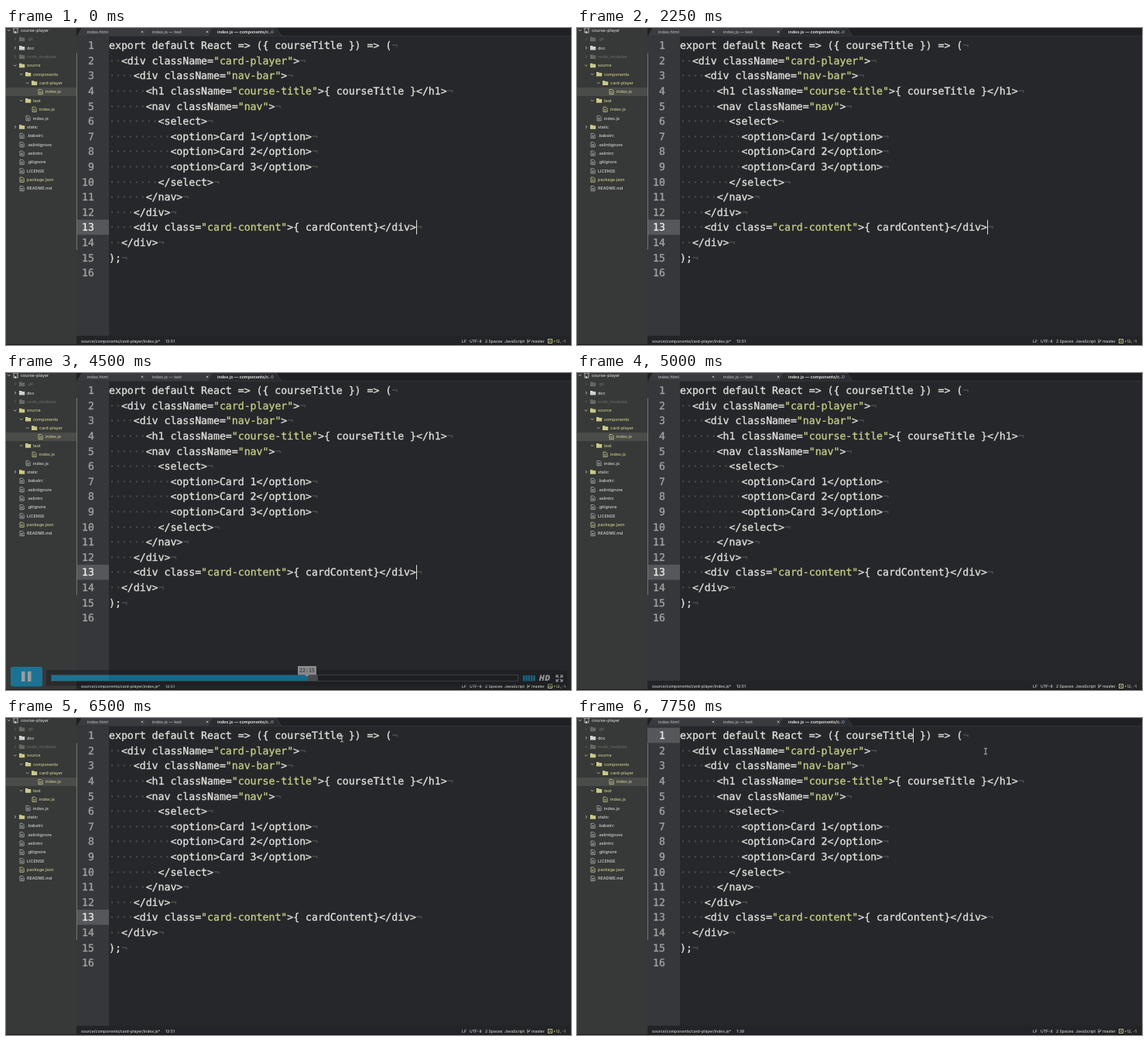
Write an HTML page that moves like this. It is 730 px wide and 410 px high and loops after 8000 ms.

```html
<!DOCTYPE html>
<html lang="en">
<head>
<meta charset="utf-8">
<title>Code editor screencast</title>
<style>
  html, body { margin: 0; width: 100%; height: 100%; overflow: hidden; background: #26272b; }
  svg { display: block; width: 730px; height: 410px; }
  text { white-space: pre; text-rendering: geometricPrecision; }
  .code { font: 13.2px "DejaVu Sans Mono", monospace; color: #deded8; }
  .code, .code tspan { fill: currentColor; stroke: currentColor; stroke-width: .35px; }
  .code .str { color: #c3cb82; }
  .code .faint { color: #56585c; stroke: none; }
  .ui { font: 500 5.4px Inter, "Liberation Sans", sans-serif; fill: #d2d3ce; }
  .status { font-size: 5.1px; }
</style>
</head>
<body>
<svg id="stage" viewBox="0 0 730 410" xmlns="http://www.w3.org/2000/svg"></svg>
<script>
const NS = "http://www.w3.org/2000/svg";
const LOOP = 8000, STEP = 250;
const CHAR = 7.947, LINE = 19.6, CODE_X = 133, TOP = 12.7;
const YELLOW = "#cbc98a", LIGHT = "#d2d3ce", DIM = "#666862", BLUE = "#00adef";
const stage = document.getElementById("stage");

function add(parent, tag, attrs = {}, content) {
  const el = document.createElementNS(NS, tag);
  for (const key in attrs) el.setAttribute(key, attrs[key]);
  if (content !== undefined) el.textContent = content;
  parent.appendChild(el);
  return el;
}
const group = (parent = stage) => add(parent, "g");
const rect = (parent, x, y, width, height, fill, more) =>
  add(parent, "rect", { x, y, width, height, fill, ...more });
const path = (parent, d, more) => add(parent, "path", { d, ...more });
const label = (x, y, content, more) =>
  add(stage, "text", { class: "ui", x, y, ...more }, content);
const status = (x, content, more) =>
  label(x, 406.8, content, { class: "ui status", ...more });
const show = (el, on) => el.setAttribute("visibility", on ? "visible" : "hidden");

// Panels
rect(stage, 0, 0, 730, 410, "#26272b");
rect(stage, 0, 0, 91, 410, "#373938");
rect(stage, 91, 10, 42, 388, "#35373a");
rect(stage, 91, 398, 639, 12, "#232428");
rect(stage, 0, 409, 730, 1, "#1d191b");

// Tabs
rect(stage, 91, 0, 639, 10.5, "#1f2023");
function tab(x, end, title, active) {
  path(stage, `M${x - 8} 10.5L${x - 2} 0H${end}L${end + 7} 10.5Z`, {
    fill: active ? "#2b2c30" : "#3a3b3e", stroke: "#4a4c50", "stroke-width": .6
  });
  label(x + 5, 7, title, { style: active ? "fill:#ececE8;font-weight:600" : "fill:#b4b6b4" });
}
tab(100, 180, "index.html");
tab(184, 265, "index.js — test");
tab(268, 349, "index.js — components/c…", true);
rect(stage, 91, 10, 639, 1, "#303236");
for (const x of [176, 260])
  path(stage, `M${x - 1.3} 3.7l2.6 2.6m0-2.6l-2.6 2.6`, { stroke: "#c0c2c0", "stroke-width": .8 });
add(stage, "circle", { cx: 344, cy: 5, r: 1.5, fill: "none", stroke: "#7890a4", "stroke-width": .8 });

// File tree: [depth, name, kind, colour]; kinds are open/closed folders and files
const tree = [
  [0, "course-player", "root", LIGHT], [1, ".git", "closed", DIM],
  [1, "doc", "closed", LIGHT], [1, "node_modules", "closed", DIM],
  [1, "source", "open", YELLOW], [2, "components", "open", YELLOW],
  [3, "card-player", "open", YELLOW], [4, "index.js", "file", YELLOW],
  [2, "test", "open", YELLOW], [3, "index.js", "file", YELLOW],
  [2, "index.js", "file", LIGHT], [1, "static", "closed", LIGHT],
  [1, ".babelrc", "file", LIGHT], [1, ".eslintignore", "file", LIGHT],
  [1, ".eslintrc", "file", LIGHT], [1, ".gitignore", "file", LIGHT],
  [1, "LICENSE", "file", LIGHT], [1, "package.json", "file", YELLOW],
  [1, "README.md", "file", LIGHT]
];
rect(stage, 0, 77, 91, 11, "#4a4c4a");
tree.forEach(([depth, name, kind, color], i) => {
  const y = 3 + i * 11.36, x = 19 + depth * 8;
  if (kind !== "file") {
    const d = kind === "closed" ? `M${x - 16} ${y - 1.7}l1.8 1.7l-1.8 1.7`
                                : `M${x - 17} ${y - .9}l1.7 1.8l1.7-1.8`;
    path(stage, d, { fill: "none", stroke: color, "stroke-width": .8 });
  }
  if (kind === "root") {
    rect(stage, x - 9, y - 3, 5, 6, "none", { stroke: color, "stroke-width": .8 });
    rect(stage, x - 7.5, y + 1, 1.5, 3, color);
  } else if (kind === "file") {
    path(stage, `M${x - 9} ${y - 3}h3.4l1.8 1.8v4.4h-5.2z`, {
      fill: "none", stroke: color === LIGHT ? "#a5b0b2" : color, "stroke-width": .8
    });
    path(stage, `M${x - 8} ${y}h3m-3 1.5h3`, { stroke: color, "stroke-width": .6 });
  } else {
    const fill = name === "static" ? YELLOW : color;
    path(stage, `M${x - 10} ${y - 2.8}h3l.8 1h3.4v4.6h-7.2z`, { fill });
  }
  label(x, y + 1.9, name, { style: `fill:${color}` });
});

// Code
const code = `export default React => ({ courseTitle }) => (
  <div className="card-player">
    <div className="nav-bar">
      <h1 className="course-title">{ courseTitle }</h1>
      <nav className="nav">
        <select>
          <option>Card 1</option>
          <option>Card 2</option>
          <option>Card 3</option>
        </select>
      </nav>
    </div>
    <div class="card-content">{ cardContent}</div>
  </div>
);
`.split("\n");
const rowMark = rect(stage, 91, 0, 42, LINE, "#55575a");
rect(stage, 91, TOP + LINE, 1, LINE * 13, "#77796a");
const numbers = code.map((line, i) => {
  const y = TOP + 14.5 + i * LINE;
  const row = add(stage, "text", { class: "code", x: CODE_X, y });
  const body = line.trimStart();
  add(row, "tspan", { class: "faint" }, "·".repeat(line.length - body.length));
  for (const part of body.split(/("[^"]*")/))
    add(row, "tspan", part[0] === '"' ? { class: "str" } : {}, part);
  if (body) add(row, "tspan", { class: "faint" }, "¬");
  return add(stage, "text", { class: "code", x: 114, y, "text-anchor": "end" }, i + 1);
});
const caret = rect(stage, 0, 0, 1, LINE - 1, "#deded8");

// Status bar
status(97, "source/components/card-player/index.js*");
const position = status(206, "");
[[589, "LF"], [599, "UTF-8"], [619, "2 Spaces"], [644, "JavaScript"], [679, "master"]]
  .forEach(([x, s]) => status(x, s));
path(stage, "M674 402.5v5m0-1.5q3 0 3-3", { fill: "none", stroke: LIGHT, "stroke-width": .8 });
rect(stage, 700.5, 402.5, 5, 5, "none", { stroke: YELLOW, "stroke-width": .9 });
rect(stage, 702.2, 404.2, 1.6, 1.6, YELLOW);
status(707, "+12, -1", { style: `fill:${YELLOW}` });

// Video controls
const player = group();
rect(player, 52, 384, 673, 20.5, "#1a1b1e", { "fill-opacity": .92 });
rect(player, 6, 380, 41, 25.5, BLUE, { rx: 3 });
const pauseIcon = group(player);
for (const x of [20, 28]) rect(pauseIcon, x, 386, 4.5, 13, "#fff");
const playIcon = path(player, "M20 386l13 6.5l-13 6.5z", { fill: "#fff" });
rect(player, 58.5, 390.5, 603, 8, "#17181b", { stroke: "#505356", "stroke-width": 1 });
rect(player, 390, 391, 13, 7, "#6a6d6f");
rect(player, 59, 391, 331, 7, BLUE);
path(player, "M377 379h24v11.5h-9.5l-2.5 2.5l-2.5-2.5h-9.5z", { fill: "#e9eaea" });
add(player, "text", {
  x: 389, y: 387.2, "text-anchor": "middle", fill: "#222",
  style: 'font:6.6px "DejaVu Sans Mono",monospace'
}, "22:15");
for (let i = 0; i < 5; i++) rect(player, 668 + i * 3.3, 391, 2.3, 7.5, BLUE);
add(player, "text", {
  x: 688.5, y: 398.3, fill: "#fff",
  style: 'font:italic 800 10.5px "Open Sans","Liberation Sans",sans-serif'
}, "HD");
path(player, "M711 394v-3h3m2 0h3v3m0 2v3h-3m-2 0h-3v-3M711 391l3 3m5-3l-3 3m3 5l-3-3m-5 3l3-3", {
  fill: "none", stroke: "#fff", "stroke-width": 1.1
});

// Pointers
const beam = path(stage, "M-2-4q2 0 2 1.2q0-1.2 2-1.2M0-3V3M-2 4q2 0 2-1.2q0 1.2 2 1.2", {
  fill: "none", stroke: "#d8d8d4", "stroke-width": .8
});
const arrow = path(stage, "M0 0v7.2l1.7-1.5l1.2 2.7l1.3-.6l-1.2-2.6h2.3z", {
  fill: "#000", stroke: "#fff", "stroke-width": .6
});

// Pointer stops: [time, x, y, shape]; no shape hides it
const stops = [
  [0], [1250, 622, 185, beam], [1500, 534, 186, beam], [1750, 138, 317, beam],
  [2000, 24, 380, arrow], [2250], [3000, 18, 396, arrow], [4500],
  [5500, 187, 262, beam], [5750, 563, 130, beam], [6000, 431, 36, beam],
  [6250, 434, 27, beam], [6750], [7250, 455, 29, beam], [7500, 508, 39, beam],
  [7750, 528, 43, beam]
];
const CLICK = 6750;

function draw(time) {
  const t = Math.floor(time / STEP) * STEP;

  const clicked = t >= CLICK;
  const row = clicked ? 0 : 12, col = clicked ? 38 : 50;
  rowMark.setAttribute("y", TOP + row * LINE);
  numbers.forEach((n, i) => n.style.color = i === row ? "#ecece8" : "#a0a2a2");
  caret.setAttribute("x", Math.floor(CODE_X + col * CHAR));
  caret.setAttribute("y", TOP + row * LINE + .5);
  position.textContent = `${row + 1}:${col + 1}`;

  // The caret rests while the video is paused, then blinks
  const phase = (t - (clicked ? CLICK : 4500) + 1600) % 800;
  show(caret, t < 3750 || phase < 400);

  const playing = t >= 3500;
  player.setAttribute("display", t >= 3000 && t < 4750 ? "inline" : "none");
  player.setAttribute("opacity", t === 3000 || t === 4500 ? .5 : 1);
  show(pauseIcon, playing);
  show(playIcon, !playing);

  const [, x, y, shape] = stops.filter(s => s[0] <= t).pop();
  show(beam, shape === beam);
  show(arrow, shape === arrow);
  if (shape) shape.setAttribute("transform", `translate(${x} ${y})`);
}

let start;
function frame(now) {
  start ??= now;
  draw((now - start) % LOOP);
  requestAnimationFrame(frame);
}
draw(0);
requestAnimationFrame(frame);
</script>
</body>
</html>
```
